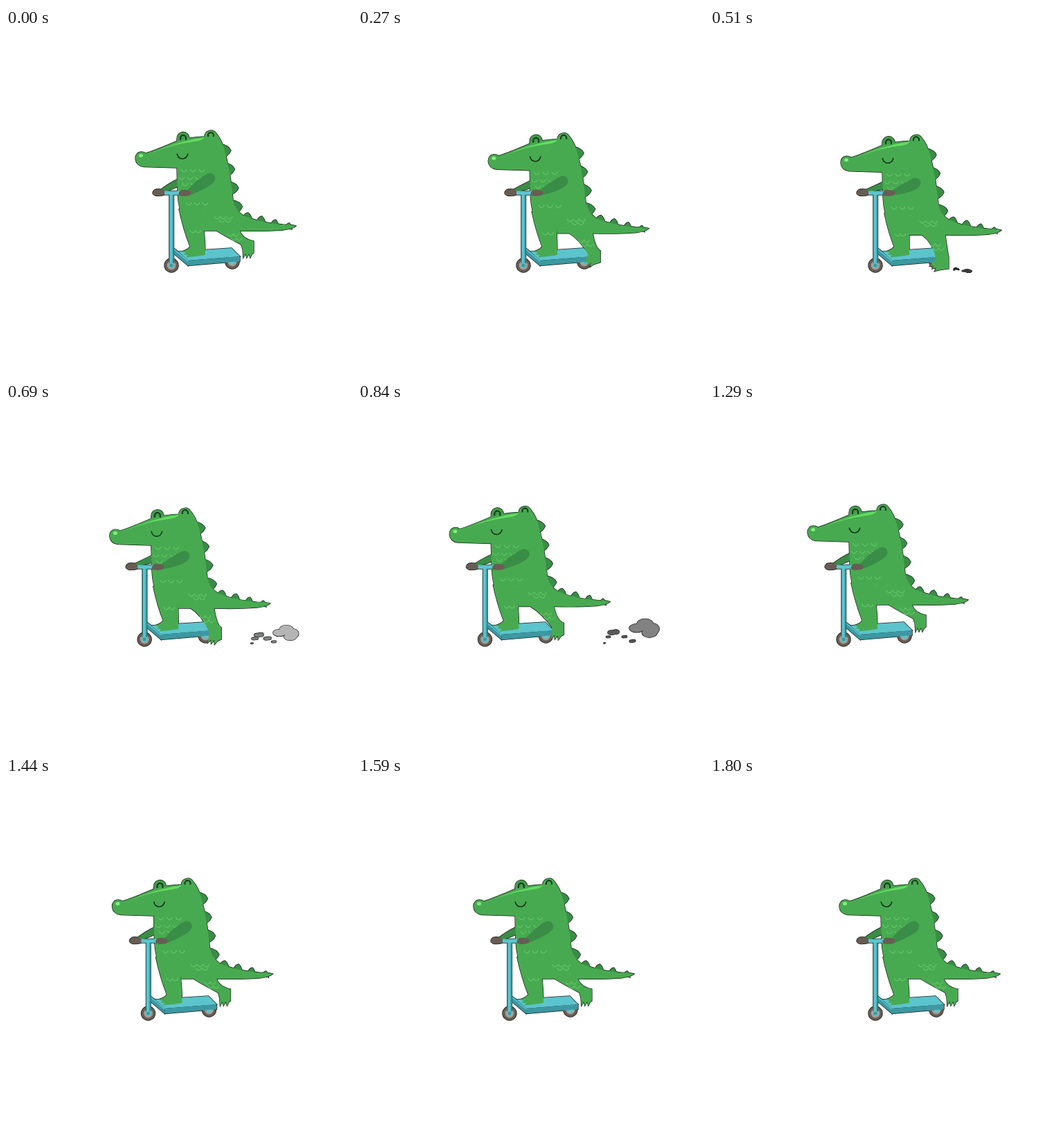
Write an HTML page with a canvas that moves like this. It is 500x500 px and loops after 1830 ms.

```html
<!DOCTYPE html>
<html lang="en">
<head>
<meta charset="utf-8">
<title>Crocodile on a scooter</title>
<style>
html, body { margin: 0; width: 100%; height: 100%; overflow: hidden; background: #fff; }
canvas { display: block; }
</style>
</head>
<body>
<canvas id="stage" width="500" height="500"></canvas>
<script>
const ctx = document.getElementById('stage').getContext('2d');
const LOOP = 1830, STEP = 30;
const GREEN = '#48aa50', DARK = '#3a8d46', LIGHT = '#69cd6d', INK = '#18361d';
const TEAL = '#5cc4cd', DEEP = '#3c98a2', BROWN = '#685d55';

// Back leg poses: ankle x, ankle y, tilt of the toes
const RAISED = [349, 313, 0], PLANTED = [336, 336, .85], PUSHING = [341, 331, .25];

let edge = false;

const clamp = p => Math.max(0, Math.min(1, p));
const progress = (t, from, to) => clamp((t - from) / (to - from));
const ease = p => (1 - Math.cos(Math.PI * p)) / 2;
const mix = (a, b, p) => a.map((v, i) => v + (b[i] - v) * p);

function paint(path, color) {
  if (edge) ctx.stroke(path);
  else { ctx.fillStyle = color; ctx.fill(path); }
}

const shape = (d, color) => paint(new Path2D(d), color);

function oval(x, y, rx, ry, color) {
  const p = new Path2D();
  p.ellipse(x, y, rx, ry, 0, 0, 7);
  paint(p, color);
}

function line(d, color, width) {
  if (edge) return;
  ctx.strokeStyle = color;
  ctx.lineWidth = width;
  ctx.stroke(new Path2D(d));
}

function scales(x, y, count, gap) {
  for (let i = 0; i < count; i++) line(`M${x + i * gap - 4} ${y - 2}q1 4 4 4t4 -4`, LIGHT, 1);
}

function shifted(x, y, draw) {
  ctx.save();
  ctx.translate(x, y);
  draw();
  ctx.restore();
}

function wheel(x, y) {
  oval(x, y, 10, 10, BROWN);
  oval(x, y, 6.5, 6.5, '#a39b92');
  oval(x, y, 4, 4, TEAL);
}

function deck() {
  wheel(327, 338);
  shape('M249 323L326 318L338 330L263 336Z', TEAL);
  shape('M263 336L338 330V337L263 343.5Z', DEEP);
  shape('M241 317L249 323L263 336V343.5L241 325Z', DEEP);
  line('M243 320L263 337', TEAL, 1.5);
}

function steering() {
  wheel(239, 343);
  shape('M236 240H242.5V341Q239 345 236 341Z', TEAL);
  line('M236 241V340M242.5 241V340', '#266872', 1);
  line('M241.2 241V340', DEEP, 1.6);
  oval(239, 343, 2.5, 2.5, DEEP);
  shape('M227 235.5H252V241H227Z', TEAL);
  shape('M217 233Q224 232 229 235V241Q224 243 217 242.5Q212 241 212 238Q213 234 217 233Z', BROWN);
}

function spikes() {
  for (let i = 0; i < 4; i++) {
    shape(`M${311 + 5.5 * i} ${168 + 27 * i}q11 2 14 9q-3 7 -9 9z`, DARK);
    const width = 15 - 2 * i, height = 8 - i;
    shape(`M${341 + 21 * i} ${275 + 4 * i}q${width * .3} ${-height} ${width * .6} ${-height}
      q${width * .3} 3 ${width * .4} ${height + 4}z`, DARK);
  }
}

function torso() {
  spikes();
  shape('M247 166V160A9 9 0 0 1 265 159V168Z', '#419c4a');
  shape(`M187 189Q187 180 195 179Q199 179 202 181Q213 178 248 163Q264 158 287 157
    A9.2 9.2 0 0 1 304 152.5Q312 162 316 177Q325 211 328 248Q330 262 343 271
    Q365 281 400 284Q414 284 419 286Q415 290 400 292Q373 294 338 293H286V286H259
    Q249 262 248 238L247 202L199 200.5Q188 199 187 189Z`, GREEN);
  if (edge) return;
  shape('M209 181Q250 163 287 158Q284 163 269 164.500Q241 168 209 181Z', '#62df5f');
  oval(195, 184.5, 3, 2.5, '#82ef7b');
  line('M252 162V159A4 4 0 0 1 260 159V162M292 157V155A4 4 0 0 1 300 155V157', INK, 2);
  line('M247 181.5Q249 189 255 189T263 181.5', INK, 1.6);
  scales(257, 206, 3, 13);
  scales(254, 217, 3, 12);
  scales(259, 226, 2, 12);
  scales(264, 254, 3, 12);
  scales(259, 266, 3, 12);
  scales(305, 274, 3, 9);
  scales(312, 279, 2, 9);
}

// The foot stays on the deck while the hip follows the body
function frontLeg(x, y) {
  shape(`M${250 + x} ${262 + y}Q${256 + x * .7} ${290 + y * .7} 266 316Q262 321 254 323L260 325L256 327.5
    L263 328L260 331.5Q275 330 288 328Q288 310 ${286 + x} ${291 + y}L${290 + x} ${265 + y}Z`, GREEN);
  shifted(x * .5, y * .8, () => {
    scales(270, 294, 2, 8);
    scales(274, 300, 1);
    scales(274, 305, 1);
  });
}

function backLeg(x, y, [ax, ay, tilt]) {
  const turn = (u, v) => `L${ax + u * Math.cos(tilt) - v * Math.sin(tilt)} ${ay + u * Math.sin(tilt) + v * Math.cos(tilt)}`;
  const left = 304 + x, right = 338 + x, hip = 293 + y;
  let toes = turn(-7, 7);
  for (let u = -6; u <= 4; u += 5) toes += turn(u, 19) + turn(u + 3, 13);
  shape(`M${left - 14} ${hip - 8}L${left} ${hip}Q${left + 16} ${hip + 10} ${ax - 9} ${ay}${toes}
    L${ax + 9} ${ay + 12}V${ay - 5}Q${right + 4} ${ay - 8} ${right} ${hip}V${hip - 8}Z`, GREEN);
  const mx = (left + right + ax) / 3, my = (hip + ay) / 2;
  scales(mx - 6, my - 4, 2, 8);
  scales(mx - 1, my + 2, 2, 8);
}

function farArm(x, y) {
  shape(`M222 235Q234 ${225 + y * .8} ${249 + x} ${218 + y * .6}V${229 + y * .6}L230 237Z`, DARK);
}

function nearArm(x, y) {
  shape(`M261 236Q${276 + x} ${218 + y} ${292 + x} ${210 + y}C${301 + x} ${208 + y} ${306 + x} ${217 + y} ${299 + x} ${224 + y}
    Q${290 + x} ${232 + y * .9} 266 241.5Z`, DARK);
  shape('M253 234Q262 233 267 236Q268 240 265 242Q257 244 250 242Q248 238 253 234Z', BROWN);
}

function rider(sink, leg) {
  const x = 2 * sink, y = 6.2 * sink;
  deck();
  farArm(x, y);
  shifted(x, y, torso);
  backLeg(x, y, leg);
  frontLeg(x, y);
  steering();
  nearArm(x, y * 1.1);
}

function dust(t) {
  const p = progress(t, 480, 1140);
  if (p <= 0 || p >= 1) return;
  const out = 1 - (1 - p) ** 4;
  const grey = 28 + 153 * Math.sin(Math.PI * p ** .6) ** 2;
  const tone = g => `rgb(${g},${g},${g})`;

  // Pebbles fan out; some drift on, the others shrink away
  for (let i = 0; i < 5; i++) {
    const angle = -.5 - .4 * Math.sin(1.3 * i - .3), far = (4 + 9 * i) * (out + .3 * p);
    const drifts = i && i % 2 == 0;
    const r = (1 + 6 * Math.sin(Math.PI * (i + .3) / 5)) * out * (drifts ? 1.25 : 1.8 * clamp(1 - 1.2 * p));
    const x = 352 + far * Math.cos(angle), y = 350 + far * Math.sin(angle);
    oval(x - r * .3, y + r * .1, r * .7, r * .38, tone(grey * .7));
    oval(x + r * .4, y, r * .6, r * .4, tone(grey * .7));
  }

  const x = 362 + 54 * out, y = 353 - 28 * out ** 1.5, rx = 4 + 18.5 * out, ry = 14 * out;
  const lobe = (u, v, a, b) => oval(x + u * rx, y + v * ry, a * rx, b * ry, tone(grey));
  lobe(-.5, 0, .5, .45);
  lobe(.05, -.4, .55, .6);
  lobe(.6, .1, .4, .6);
  lobe(.35, .5, .5, .5);
}

// Shove off quickly, then drift back to the start
function ride(t) {
  const push = 1 - (1 - progress(t, 540, 1080)) ** 3.2;
  return -60 * (push - progress(t, 1080, 1800) ** 1.18);
}

const crouch = t => ease(progress(t, 0, 480)) - ease(progress(t, 540, 1080));

function legPose(t) {
  const planted = mix(RAISED, PLANTED, ease(progress(t, 0, 480)));
  const pushing = mix(planted, PUSHING, ease(progress(t, 540, 690)));
  return mix(pushing, RAISED, ease(progress(t, 690, 1050)));
}

function draw() {
  const t = Math.floor(performance.now() % LOOP / STEP) * STEP;
  const scene = [() => dust(t), () => shifted(ride(t), 0, () => rider(crouch(t), legPose(t)))];
  ctx.clearRect(0, 0, 500, 500);
  for (const part of scene) {
    // A thin dark rim shows only around the silhouette
    for (edge of [true, false]) {
      ctx.strokeStyle = '#121a13';
      ctx.lineWidth = 1.4;
      part();
    }
  }
  requestAnimationFrame(draw);
}
draw();
</script>
</body>
</html>
```
